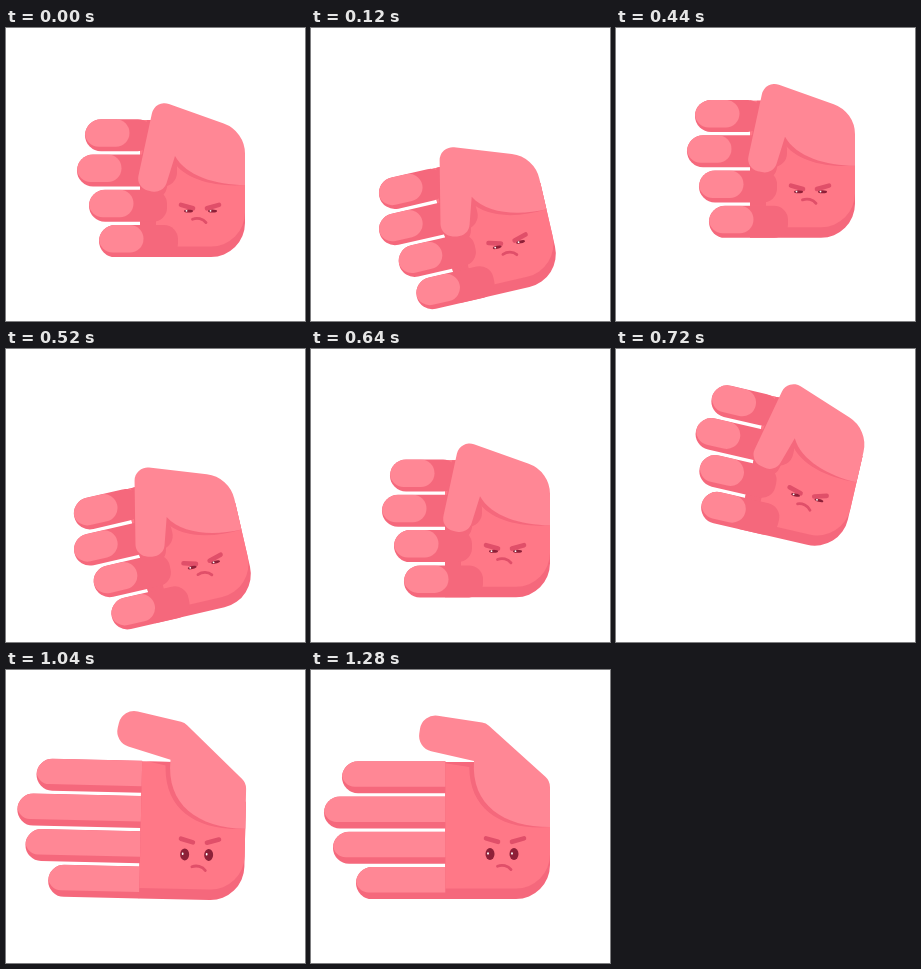
Write an HTML page with a canvas that moves like this. It is 299 px wide and 293 px high and loops after 1.4 s.

```html
<!DOCTYPE html>
<html lang="en">
<head>
<meta charset="utf-8">
<title>Shaking fist</title>
<style>
  html, body { margin: 0; width: 100%; height: 100%; overflow: hidden; background: #fff; }
  canvas { display: block; width: 100vw; height: 100vh; }
</style>
</head>
<body>
<canvas id="stage"></canvas>
<script>
const W = 299, H = 293, LOOP = 1400, STEP = 40, LAST = 1280, BEAT = 200;
const LIGHT = '#ff8795', PALM = '#ff7887', DARK = '#f5687c', BROW = '#e04f69', EYE = '#8e2038';
const WRIST = { x: 239, y: 157 };
const PALM_LEFT = 134;

const canvas = document.getElementById('stage');
const ctx = canvas.getContext('2d');

const rad = deg => deg * Math.PI / 180;
const mix = (a, b, k) => a + (b - a) * k;
const clamp = k => Math.max(0, Math.min(1, k));
const ease = k => k < 0.5 ? 0.5 * (2 * k) ** 2.4 : 1 - 0.5 * (2 - 2 * k) ** 2.4;
const ramp = (t, from, to) => ease(clamp((t - from) / (to - from)));

// Swings 0 → 1 → -1 → 1 → -1, then returns to 0 between settle and rest.
function shake(t, first, settle, rest) {
  if (t < first) return ramp(t, 0, first);
  const beats = (t - first) / BEAT, n = Math.floor(beats);
  if (n >= 3) return ramp(t, settle, rest) - 1;
  return mix(1, -1, ease(beats - n)) * (n % 2 ? -1 : 1);
}

const FINGERS = [
  { folded: 79, open: 31, knuckle: 146 },
  { folded: 71, open: 13, knuckle: 171 },
  { folded: 83, open: 22, knuckle: 161 },
  { folded: 93, open: 45, knuckle: 172 }
];

function fill(path, color) {
  ctx.fillStyle = color;
  ctx.fill(path);
}

function roundBar(left, right, y, h, rLeft, rRight) {
  const p = new Path2D();
  p.roundRect(left, y, right - left, h, [rLeft, rRight, rRight, rLeft]);
  return p;
}

function palmPath(bottom) {
  const p = new Path2D();
  p.moveTo(PALM_LEFT, 92);
  p.lineTo(165, 92);
  p.lineTo(200, 130);
  p.lineTo(WRIST.x, 130);
  p.arcTo(WRIST.x, bottom, PALM_LEFT, bottom, 34);
  p.lineTo(PALM_LEFT, bottom);
  return p;
}

// The tip swings on an arm around a pivot between notch and knuckle.
function thumbPath(open) {
  const m = (a, b) => mix(a, b, open);
  const notchX = m(169, 163), notchY = m(128, 91);
  const angle = rad(m(103, 189)), arm = m(64.5, 60), half = m(14, 17.5);
  const tipX = m(158, 168) + arm * Math.cos(angle);
  const tipY = m(100, 70) + arm * Math.sin(angle);
  const dx = half * Math.sin(angle), dy = -half * Math.cos(angle);
  const inner = [tipX + dx, tipY + dy], outer = [tipX - dx, tipY - dy];
  const knuckle = [m(149, 175), m(71, 53)], shoulder = [WRIST.x, m(103, 111)];

  const p = new Path2D();
  p.moveTo(WRIST.x, WRIST.y);
  p.bezierCurveTo(m(210, 192), WRIST.y, notchX + m(11, -3), notchY + m(20, 44), notchX, notchY);
  p.arcTo(...inner, ...outer, half * 0.89);
  p.arcTo(...outer, ...knuckle, half * 0.89);
  p.arcTo(...knuckle, ...shoulder, 13);
  p.arcTo(...shoulder, WRIST.x, WRIST.y, m(32, 14));
  p.closePath();
  return p;
}

function drawPalm(thumb) {
  const body = palmPath(229);
  fill(body, DARK);
  fill(palmPath(218.5), PALM);
  // Thumb shadow, tapering towards the wrist.
  ctx.save();
  ctx.clip(body);
  ctx.translate(WRIST.x, WRIST.y);
  ctx.rotate(rad(-4.3));
  ctx.translate(-WRIST.x, -WRIST.y);
  fill(thumb, DARK);
  ctx.restore();
}

function drawFingers(open) {
  const k = clamp(open), r = 16;
  ctx.fillStyle = DARK;
  ctx.fillRect(PALM_LEFT, 130, mix(16, 0, k), 85);
  FINGERS.forEach((finger, i) => {
    const y = 91.2 + 35.3 * i, h = mix(27.5, 25.5, k);
    const left = mix(finger.folded, finger.open, open);
    const lightEnd = mix(finger.folded + 44.5, PALM_LEFT + 0.5, k);
    const outline = roundBar(left, mix(finger.knuckle, PALM_LEFT + 0.5, k), y, 2 * r, r, mix(14, 0, k));
    fill(outline, DARK);
    ctx.save();
    ctx.clip(outline);
    fill(roundBar(left, lightEnd, y, h, h / 2, mix(13.7, 0, k)), LIGHT);
    ctx.restore();
  });
}

function drawFace(look) {
  const browY = mix(178.7, 170.2, look), mouthY = mix(192, 197, look), eyeY = mix(183, 184, look);
  const ry = mix(1.5, 6, look);
  ctx.lineCap = 'round';
  ctx.strokeStyle = BROW;
  for (const side of [-1, 1]) {
    const browX = 194 + side * 13, eyeX = mix(194.5, 191, look) + side * 12;
    ctx.lineWidth = 4.6;
    ctx.beginPath();
    ctx.moveTo(browX + side * 6, browY - 1.8);
    ctx.lineTo(browX - side * 6, browY + 1.6);
    ctx.stroke();

    ctx.fillStyle = EYE;
    ctx.beginPath();
    ctx.ellipse(eyeX, eyeY, 4.5, ry, 0, 0, 7);
    ctx.fill();
    ctx.fillStyle = '#fff';
    ctx.beginPath();
    ctx.ellipse(eyeX - 2, eyeY - ry * 0.1, 0.9, Math.min(1.2, ry * 0.6), 0, 0, 7);
    ctx.fill();
  }
  ctx.lineWidth = 2.8;
  ctx.beginPath();
  ctx.moveTo(186.5, mouthY - 0.8);
  ctx.bezierCurveTo(191, mouthY - 2.6, 197, mouthY - 1.6, 200, mouthY + 2.6);
  ctx.stroke();
}

function draw(t) {
  const bob = shake(t, 160, 760, 990), tilt = shake(t, 140, 800, 1120);
  const open = 1.1 * ramp(t, 900, 1075) - 0.1 * ramp(t, 1075, 1260);
  const thumb = thumbPath(open);
  ctx.setTransform(canvas.width / W, 0, 0, canvas.height / H, 0, 0);
  ctx.fillStyle = '#fff';
  ctx.fillRect(0, 0, W, H);
  ctx.translate(160 - 3.5 * tilt + tilt * tilt, 153 + 46.5 * bob);
  ctx.rotate(rad(-13.3 * tilt));
  ctx.translate(-160, -153);
  drawPalm(thumb);
  drawFingers(open);
  fill(thumb, LIGHT);
  drawFace(ramp(t, 790, 970));
}

function resize() {
  const ratio = window.devicePixelRatio || 1;
  canvas.width = Math.round(innerWidth * ratio) || W;
  canvas.height = Math.round(innerHeight * ratio) || H;
}

let start;
function tick(now) {
  start ??= now;
  const t = (now - start) % LOOP;
  draw(Math.min(LAST, Math.floor(t / STEP) * STEP));
  requestAnimationFrame(tick);
}

addEventListener('resize', resize);
resize();
draw(0);
requestAnimationFrame(tick);
</script>
</body>
</html>
```
